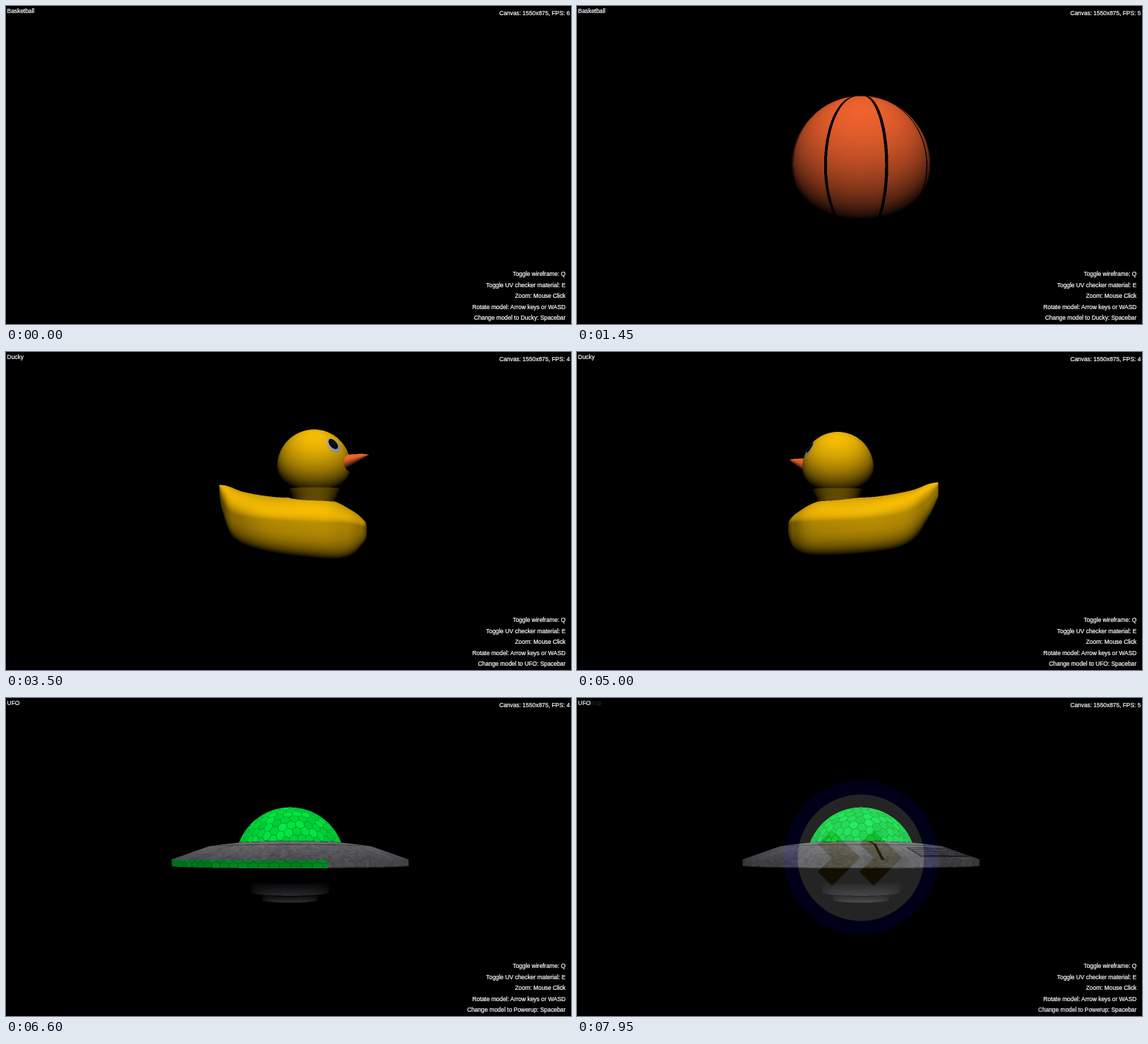
These frames come from a looping animation (800x450 px, 8000 ms). An HTML page with a canvas:

```html
<!DOCTYPE html>
<html lang="en">
<head>
<meta charset="utf-8">
<title>Model viewer</title>
<style>
  html, body { margin: 0; width: 100%; height: 100%; overflow: hidden; background: #000; }
  canvas, svg { position: absolute; left: 0; top: 0; width: 800px; height: 450px; }
  text { font: 8.37px "Liberation Sans", Arial, sans-serif; fill: #fff; stroke: #fff; stroke-width: 0.22px; }
  .right text { text-anchor: end; }
  .fade { mix-blend-mode: plus-lighter; }
</style>
</head>
<body>
<canvas id="stage" width="800" height="450"></canvas>
<svg viewBox="0 0 800 450">
  <g id="powerup" class="fade" opacity="0">
    <circle cx="402" cy="226" r="109.5" fill="#0000aa"/>
    <circle cx="402" cy="226" r="89.5" fill="#fff"/>
    <path id="chevron" d="M361 187 401 226 361 266 341 246 361 226 341 207Z" fill="#7d6900"/>
    <use href="#chevron" x="59"/>
  </g>
  <g id="names"></g>
  <g class="right">
    <text id="fps" x="798.3" y="13"></text>
    <text x="792.3" y="382">Toggle wireframe: Q</text>
    <text x="792.3" y="397.6">Toggle UV checker material: E</text>
    <text x="792.3" y="413.1">Zoom: Mouse Click</text>
    <text x="792.3" y="428.6">Rotate model: Arrow keys or WASD</text>
    <g id="hints"></g>
  </g>
</svg>
<script>
const LOOP = 8000, STEP = 50, FADE = 350;
const FADE_STARTS = [2200, 5150, 7900];
const NAMES = ['Basketball', 'Ducky', 'UFO', 'Powerup', 'Rocket'];
const TAU = 2 * Math.PI, RAD = Math.PI / 180;

const clamp = (x, lo = 0, hi = 1) => Math.min(hi, Math.max(lo, x));
const mod = (x, m) => ((x % m) + m) % m;
const hash = (a, b) => mod(Math.sin(a * 127.1 + b * 311.7) * 43758.5453, 1);
const byId = id => document.getElementById(id);

// ---- Software renderer: parametric meshes, depth buffer, per-pixel paint ----
const VIEW = { x: 222, y: 100, w: 360, h: 200 };
const CENTER = { x: 402, y: 225 }, CAMERA = 588, SCALE = 2;
const W = VIEW.w * SCALE, H = VIEW.h * SCALE;

const ctx = byId('stage').getContext('2d');
const buffer = document.createElement('canvas');
buffer.width = W;
buffer.height = H;
const bufferCtx = buffer.getContext('2d');
const image = bufferCtx.createImageData(W, H);
const depth = new Float32Array(W * H);

const sub = (a, b) => a.map((x, i) => x - b[i]);
const dot = (a, b) => a[0] * b[0] + a[1] * b[1] + a[2] * b[2];
function unitCross(a, b) {
  const n = [a[1] * b[2] - a[2] * b[1], a[2] * b[0] - a[0] * b[2], a[0] * b[1] - a[1] * b[0]];
  const len = Math.hypot(...n) || 1;
  return n.map(x => x / len);
}

function mesh(cols, rows, surface, paint) {
  const verts = [], e = 0.004;
  for (let j = 0; j <= rows; j++) for (let i = 0; i <= cols; i++) {
    const u = i / cols, v = j / rows, w = clamp(v, 0.02, 0.98);
    const n = unitCross(sub(surface(u + e, w), surface(u - e, w)),
                        sub(surface(u, w + e), surface(u, w - e)));
    verts.push({ p: surface(u, v), n, u, v });
  }
  const mean = [0, 1, 2].map(k => verts.reduce((s, q) => s + q.p[k], 0) / verts.length);
  const outward = verts.reduce((s, q) => s + dot(q.n, sub(q.p, mean)), 0);
  if (outward < 0) for (const q of verts) q.n = q.n.map(x => -x);
  return { cols, rows, verts, paint };
}

function project(vert, cos, sin) {
  const turn = ([x, y, z]) => [x * cos + z * sin, y, z * cos - x * sin];
  const p = turn(vert.p), n = turn(vert.n), s = CAMERA / (CAMERA - p[2]);
  return {
    x: (CENTER.x - VIEW.x + p[0] * s) * SCALE,
    y: (CENTER.y - VIEW.y + p[1] * s) * SCALE,
    s, n, u: vert.u, v: vert.v,
    front: dot(n, [-p[0], -p[1], CAMERA - p[2]]) > 0
  };
}

// The light sits above and in front of the model.
const light = (ny, nz) => Math.pow(Math.max(0, 0.707 * (nz - ny)), 0.8);

function triangle(a, b, c, paint) {
  if (!a.front && !b.front && !c.front) return;
  const area = (b.x - a.x) * (c.y - a.y) - (c.x - a.x) * (b.y - a.y);
  if (Math.abs(area) < 1e-6) return;
  const x0 = Math.max(0, Math.ceil(Math.min(a.x, b.x, c.x))), x1 = Math.min(W - 1, Math.max(a.x, b.x, c.x));
  const y0 = Math.max(0, Math.ceil(Math.min(a.y, b.y, c.y))), y1 = Math.min(H - 1, Math.max(a.y, b.y, c.y));
  for (let y = y0; y <= y1; y++) for (let x = x0; x <= x1; x++) {
    const kb = ((x - a.x) * (c.y - a.y) - (c.x - a.x) * (y - a.y)) / area;
    const kc = ((b.x - a.x) * (y - a.y) - (x - a.x) * (b.y - a.y)) / area;
    const ka = 1 - kb - kc;
    if (ka < -1e-6 || kb < -1e-6 || kc < -1e-6) continue;
    const s = ka * a.s + kb * b.s + kc * c.s, at = y * W + x;
    if (s <= depth[at]) continue;
    depth[at] = s;
    const ny = ka * a.n[1] + kb * b.n[1] + kc * c.n[1];
    const nz = ka * a.n[2] + kb * b.n[2] + kc * c.n[2];
    const [color, shade] = paint(ka * a.u + kb * b.u + kc * c.u, ka * a.v + kb * b.v + kc * c.v, light(ny, nz), nz);
    for (let k = 0; k < 3; k++) image.data[at * 4 + k] = color[k] * shade;
    image.data[at * 4 + 3] = 255;
  }
}

function drawModel(parts, degrees, alpha) {
  image.data.fill(0);
  depth.fill(0);
  const cos = Math.cos(degrees * RAD), sin = Math.sin(degrees * RAD);
  for (const { cols, rows, verts, paint } of parts) {
    const q = verts.map(v => project(v, cos, sin));
    for (let j = 0; j < rows; j++) for (let i = 0; i < cols; i++) {
      const k = j * (cols + 1) + i, below = k + cols + 1;
      triangle(q[k], q[k + 1], q[below], paint);
      triangle(q[k + 1], q[below + 1], q[below], paint);
    }
  }
  bufferCtx.putImageData(image, 0, 0);
  ctx.globalAlpha = alpha;
  ctx.drawImage(buffer, VIEW.x, VIEW.y, VIEW.w, VIEW.h);
}

// ---- Surfaces ----
const sphere = (r, y = 0, z = 0) => (u, v) => {
  const ring = r * Math.sin(Math.PI * v);
  return [ring * Math.sin(TAU * u), y - r * Math.cos(Math.PI * v), z + ring * Math.cos(TAU * u)];
};
const frustum = (r0, y0, r1, y1, z = 0) => (u, v) => {
  const r = r0 + (r1 - r0) * v;
  return [r * Math.sin(TAU * u), y0 + (y1 - y0) * v, z + r * Math.cos(TAU * u)];
};

// ---- Basketball ----
const BLACK = [0, 0, 0], ORANGE = [238, 98, 46];
const ball = [mesh(64, 40, sphere(96.6), (u, v, lit) => {
  const seam = Math.abs(mod(8 * u + 0.5, 1) - 0.5) / 8 * TAU * 96.6 * Math.sin(Math.PI * v);
  return [seam < 2 ? BLACK : ORANGE, lit];
})];

// ---- Duck ----
const YELLOW = [246, 188, 4];
const paintYellow = (u, v, lit) => [YELLOW, lit];
// Cross-sections from tail to chest: position, back, ridge, belly, half width.
const SECTIONS = [
  [-108, -39, -34, -20, 2], [-95, -37, -15, 12, 20], [-70, -28, 2, 50, 45], [-20, -20, 10, 67, 66],
  [50, -17, 14, 73, 64], [85, -2, 15, 66, 44], [103, 12, 20, 45, 20], [107, 20, 25, 32, 2]
];
function section(v) {
  const last = SECTIONS.length - 1, x = v * last, i = clamp(Math.floor(x), 0, last - 1), f = x - i;
  const [a, b, c, d] = [-1, 0, 1, 2].map(k => SECTIONS[clamp(i + k, 0, last)]);
  return b.map((y, k) => y + 0.5 * f * (c[k] - a[k]
    + f * (2 * a[k] - 5 * y + 4 * c[k] - d[k] + f * (3 * (y - c[k]) + d[k] - a[k]))));
}
function duckBody(u, v) {
  const [z, back, ridge, belly, width] = section(v);
  const c = Math.cos(TAU * u), s = Math.sin(TAU * u), power = s > 0 ? 1 : 0.7;
  return [width * Math.sign(c) * Math.abs(c) ** power,
          ridge + ((s > 0 ? back : belly) - ridge) * Math.abs(s) ** power, z];
}
function duckBeak(u, v) {
  const r = Math.max(0, 1 - v) ** 0.8;
  return [36 * r * Math.cos(TAU * u), -54 - 22 * v + 21 * r * Math.sin(TAU * u), 58 + 52 * v];
}
function paintHead(u, v, lit) {
  const azimuth = Math.abs(mod(u + 0.5, 1) - 0.5) * 360 - 42;
  const lift = 90 - v * 180 - 29;
  const dx = azimuth * 0.86;
  if (Math.hypot(dx / 11.5, lift / 13.5) > 1) return [YELLOW, lit];
  return Math.hypot(dx / 8, (lift - 2) / 9.5) < 1 ? [[14, 14, 16], lit] : [[175, 175, 175], lit];
}
const duck = [
  mesh(48, 42, duckBody, paintYellow),
  mesh(44, 30, sphere(51, -62, 34), paintHead),
  mesh(36, 3, frustum(41, -31, 32, -13, 34), paintYellow),
  mesh(24, 12, duckBeak, (u, v, lit) => [[240, 104, 44], lit])
];

// ---- UFO ----
function hex(x, y) {
  const h = Math.sqrt(3);
  const a = [mod(x, 1) - 0.5, mod(y, h) - h / 2];
  const b = [mod(x - 0.5, 1) - 0.5, mod(y - h / 2, h) - h / 2];
  const [gx, gy] = Math.hypot(...a) < Math.hypot(...b) ? a : b;
  const ax = Math.abs(gx);
  return { edge: 0.5 - Math.max(ax, ax / 2 + Math.abs(gy) * 0.866),
           tone: hash(Math.round(2 * (x - gx)), Math.round(2 * (y - gy) / h)) };
}
function greenCells(x, y) {
  const { edge, tone } = hex(x, y);
  return edge < 0.04 ? [0, 158, 44] : [0, 204 + 34 * tone, 54 + 12 * tone];
}
function dome(u, v) {
  const R = 76.8, a = 1.214 * v;
  return [R * Math.sin(a) * Math.sin(TAU * u), 6.8 - R * Math.cos(a), R * Math.sin(a) * Math.cos(TAU * u)];
}
const metal = (u, v, rows, tone) => {
  const g = tone + 18 * (hash(Math.floor(u * 260), Math.floor(v * rows)) - 0.5)
    + 10 * (hash(Math.floor(u * 40), 7) - 0.5);
  return [g, g, g + 4];
};
// Seams: azimuth in degrees, half width in world pixels.
const DARK = [16, 15, 17];
const SEAMS = [[0, 1.8], [268, 1.6], [181, 0.8]];
const onSeam = (degrees, radius) => SEAMS.some(([at, half]) =>
  Math.abs(mod(degrees - at + 180, 360) - 180) * RAD * radius < half);
function paintSlope(u, v, lit) {
  const az = u * 360;
  if (onSeam(az, 112 + 49 * v)) return [DARK, 1];
  const px = (az - 285) / 43, py = (v - 0.2) / 0.62;
  if (px > 0 && px < 1 && py > 0 && py < 1) {
    const frame = Math.min(px, 1 - px) < 0.04 || Math.min(py, 1 - py) < 0.1;
    if (frame || mod(py * 5, 1) < 0.4) return [[34, 34, 37], 1];
  }
  return [metal(u, v, 10, 104 - 26 * v), v < 0.06 ? 0.6 : 0.55 + 0.45 * lit];
}
function paintRim(u, v, lit) {
  const az = mod(u * 360 + 3, 360);
  if (az < 125) return [greenCells(u * 90, v * 1.2), 0.4 + 0.25 * lit];
  return [metal(u, v, 3, 84), v > 0.88 ? 0.5 : 0.6 + 0.42 * lit];
}
const ufo = [
  mesh(56, 20, dome, (u, v, lit) => {
    const r = 93 * v / 13;
    return [greenCells(r * Math.sin(TAU * u), r * Math.cos(TAU * u)), 0.72 + 0.28 * lit];
  }),
  mesh(72, 3, frustum(71, -20, 112, -15), (u, v, lit) =>
    onSeam(u * 360, 71 + 41 * v) ? [DARK, 1] : [metal(u, v, 5, 118), v < 0.08 ? 0.3 : 0.5 + 0.5 * lit]),
  mesh(72, 6, frustum(112, -15, 161.5, 3), paintSlope),
  mesh(72, 2, frustum(161.5, 3, 161.5, 11.5), paintRim),
  mesh(40, 3, frustum(56, 34, 55, 49.5), (u, v, lit, nz) => [[42, 41, 46], (0.15 + 0.85 * v) * Math.max(0, nz)]),
  mesh(40, 2, frustum(40, 51.8, 40, 60), (u, v, lit, nz) => [[48, 47, 52], (0.3 + 0.7 * v) * Math.max(0, nz)])
];

// ---- Timeline ----
const MODELS = [
  { parts: ball, from: 50, angle: t => 0.12 * t - 20.5 },
  { parts: duck, from: 0, angle: t => 75 + 0.12 * (t - 3500) },
  { parts: ufo, from: 5650, angle: t => 0.154 * (t - 7300) }
];

function addText(parent, x, y, content) {
  const el = document.createElementNS('http://www.w3.org/2000/svg', 'text');
  el.setAttribute('x', x);
  el.setAttribute('y', y);
  el.setAttribute('class', 'fade');
  el.textContent = content;
  return parent.appendChild(el);
}
const labels = NAMES.slice(0, 4).map((name, i) => [
  addText(byId('names'), 1.6, 10, name),
  addText(byId('hints'), 792.3, 444.2, `Change model to ${NAMES[i + 1]}: Spacebar`)
]);

const faded = (t, i) => clamp((t - FADE_STARTS[i]) / FADE);
const weight = (t, i) => (i > 0 ? faded(t, i - 1) : 1) * (i < 3 ? 1 - faded(t, i) : 1);
const fpsAt = t => t < 1000 ? 6 : t < 3000 ? 5 : t < 7000 ? 4 : 5;

function draw(t) {
  ctx.globalAlpha = 1;
  ctx.globalCompositeOperation = 'source-over';
  ctx.fillStyle = '#000';
  ctx.fillRect(0, 0, 800, 450);
  ctx.globalCompositeOperation = 'lighter';
  MODELS.forEach(({ parts, from, angle }, i) => {
    const alpha = weight(t, i);
    if (alpha > 0 && t >= from) drawModel(parts, angle(t), alpha);
  });
  labels.forEach((pair, i) => pair.forEach(el => el.setAttribute('opacity', weight(t, i))));
  byId('powerup').setAttribute('opacity', weight(t, 3));
  byId('fps').textContent = `Canvas: 1550x875, FPS: ${fpsAt(t)}`;
}

const start = performance.now();
let shown = -1;
function tick() {
  const t = Math.floor((performance.now() - start) % LOOP / STEP) * STEP;
  if (t !== shown) draw(shown = t);
  requestAnimationFrame(tick);
}
tick();
</script>
</body>
</html>
```
